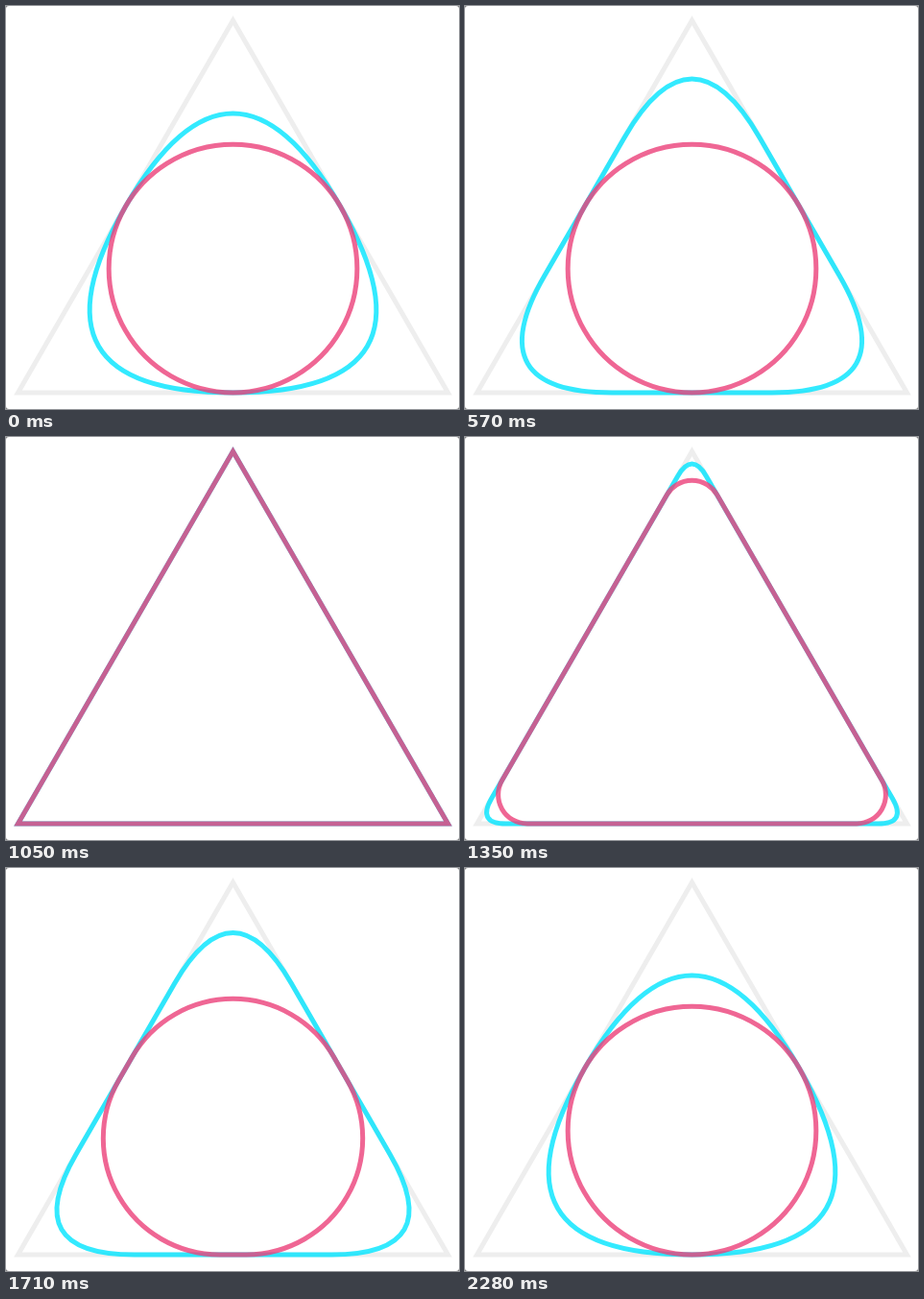
An HTML page that plays this animation: 472x420 px, repeating every 2310 ms.

```html
<!DOCTYPE html>
<html lang="en">
<head>
<meta charset="utf-8">
<title>Rounded triangle</title>
<style>
  html, body { margin: 0; width: 100%; height: 100%; overflow: hidden; background: #777; }
  svg { display: block; width: 472px; height: 420px; background: #fff; border-radius: 3px; }
  path { fill: none; stroke-width: 5; stroke-miterlimit: 10; }
</style>
</head>
<body>
<svg viewBox="0 0 472 420">
  <path id="base" stroke="#eee"/>
  <path id="quad" stroke="#00e5ff" stroke-opacity=".8"/>
  <path id="arc" stroke="#ec407a" stroke-opacity=".8"/>
</svg>
<script>
const LOOP = 2310, STEP = 30;
const DOWN_END = 1050, UP_START = 1290, UP_END = 2280;
const SIDE = 448, HALF = SIDE / 2, INRADIUS = HALF / Math.sqrt(3);
const corners = [[236.5, 15], [460.5, 403], [12.5, 403]];
const [base, quad, arc] = ['base', 'quad', 'arc'].map(id => document.getElementById(id));

const fmt = p => p.map(v => v.toFixed(3)).join(' ');

// Point at distance d from corner a on the edge towards corner b
const along = (a, b, d) => a.map((v, i) => v + (b[i] - v) * d / SIDE);

// Closed triangle with each corner cut back and bridged by a curve
function outline(cut, bridge) {
  if (cut < 0.01) return 'M' + corners.map(fmt).join('L') + 'Z';
  return corners.map((c, i) => {
    const from = along(c, corners[(i + 2) % 3], cut);
    const to = along(c, corners[(i + 1) % 3], cut);
    return (i ? 'L' : 'M') + fmt(from) + bridge(c) + fmt(to);
  }).join('') + 'Z';
}

// Corner size over the loop: speeds up going down, rests, slows going up
function cornerSize(t) {
  if (t < DOWN_END) return HALF * (1 - Math.pow(t / DOWN_END, 1.62));
  if (t < UP_START) return 0;
  return HALF * Math.pow(Math.min(1, (t - UP_START) / (UP_END - UP_START)), 0.715);
}

function draw(t) {
  const size = cornerSize(t);
  const radius = Math.min(size, INRADIUS);
  quad.setAttribute('d', outline(size, c => `Q${fmt(c)} `));
  arc.setAttribute('d', outline(radius * Math.sqrt(3), () => `A${radius} ${radius} 0 0 1 `));
}

base.setAttribute('d', outline(0));
const start = performance.now();
function tick() {
  const t = (performance.now() - start) % LOOP;
  draw(Math.floor(t / STEP) * STEP);
  requestAnimationFrame(tick);
}
tick();
</script>
</body>
</html>
```
